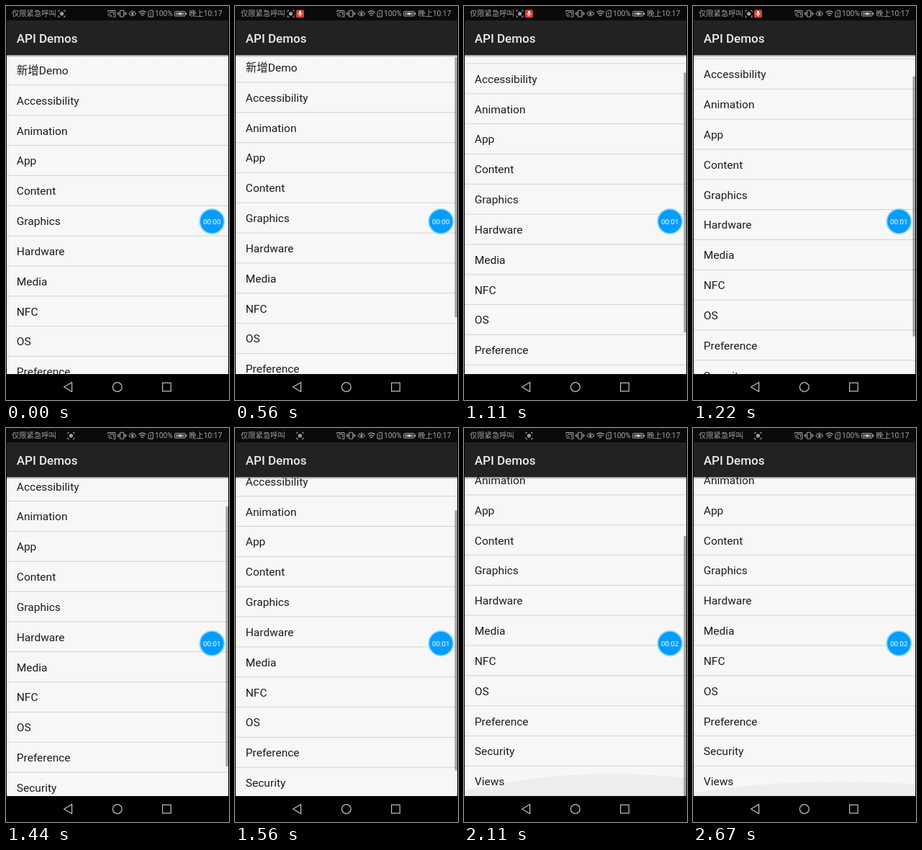
Recreate the animation shown at these times as an HTML page. Size 310 by 547 pixels, loop 3000 ms.

```html
<!DOCTYPE html>
<html lang="zh-CN">
<head>
<meta charset="utf-8">
<title>API Demos</title>
<style>
html, body { margin: 0; width: 100%; height: 100%; overflow: hidden; background: #000; }
svg { display: block; width: 310px; height: 547px; }
text { font-family: Roboto, "Noto Sans CJK SC", "Noto Sans CJK", sans-serif; }
#list text { font-size: 15.5px; fill: #1c1c1c; }
.status text { font-size: 10.3px; fill: #a3a3a3; }
.line { fill: none; stroke: #a8a8a8; }
</style>
</head>
<body>
<svg viewBox="0 0 310 547">
  <defs>
    <clipPath id="view"><rect x="1" y="68" width="308" height="443"/></clipPath>
    <linearGradient id="shade" x2="0" y2="1">
      <stop offset="0" stop-color="#000" stop-opacity=".45"/>
      <stop offset="1" stop-color="#000" stop-opacity="0"/>
    </linearGradient>
  </defs>
  <rect width="310" height="547"/>

  <g clip-path="url(#view)">
    <rect x="1" y="68" width="308" height="443" fill="#f7f7f7"/>
    <g id="list"></g>
    <path id="glow" fill="#000" fill-opacity=".04"/>
    <rect id="thumb" x="305.4" width="3.6" fill="#000"/>
  </g>

  <rect x="1" width="308" height="20" fill="#0a0a0a"/>
  <rect x="1" y="20" width="308" height="48" fill="#222"/>
  <rect x="1" y="68" width="308" height="3" fill="url(#shade)"/>
  <text x="14.8" y="51.2" font-size="17" font-weight="500" fill="#eee">API Demos</text>

  <g class="status">
    <text x="8" y="14.3">仅限紧急呼叫</text>
    <text x="207" y="14.3">100%</text>
    <text x="254.2" y="14.3">晚上10:17</text>
    <g id="focus">
      <circle r="2.7" fill="#999"/>
      <path class="line" stroke="#888" d="M-4.5-2.5v-2h2M2.5-4.5h2v2M4.5 2.5v2h-2M-2.5 4.5h-2v-2"/>
    </g>
    <g id="mic">
      <rect x="85" y="5.2" width="11" height="11" rx="2" fill="#d5402f"/>
      <rect x="89.2" y="6.8" width="2.6" height="4.6" rx="1.3" fill="#fff"/>
      <path d="M87.8 10a2.7 2.7 0 0 0 5.4 0M90.5 12.7v1.7" fill="none" stroke="#fff" stroke-width=".9"/>
    </g>
    <g class="line">
      <path d="M141.7 8.5v-2h10.2v8.6h-3.4M141.7 10.2a5 5 0 0 1 5 5M141.7 12.4a2.8 2.8 0 0 1 2.8 2.8M144 8.7h5.7v4.2"/>
      <path d="M158.6 6.2h5v8.8h-5zM156.8 7.8v5.6M165.4 7.8v5.6M155.2 9v3M167 9v3"/>
      <path d="M170.6 10.8q5.2-5.6 10.4 0q-5.2 5.6-10.4 0zM172 7.2l1 1.2M175.8 5.6v1.6M179.6 7.2l-1 1.2"/>
      <path d="M184.6 9q5-4.2 10 0M186.4 11.2q3.2-2.6 6.4 0M188 13.2q1.6-1.2 3.2 0" stroke-width="1.2"/>
      <path d="M198 8.4l2.2-2.2h4.2v8.8h-6.4zM201.2 8.6v3M201.2 12.4v1.2"/>
      <rect x="234.6" y="7.4" width="14.6" height="6.6" rx="1"/>
    </g>
    <circle cx="175.8" cy="10.8" r="1.6" fill="#a8a8a8"/>
    <rect x="236" y="8.8" width="11.8" height="3.8" fill="#777"/>
    <rect x="249.6" y="9.2" width="1.6" height="3" fill="#a8a8a8"/>
    <path d="M239 11l4-2.2-.6 1.6h3l-4 2.4.6-1.8z" fill="#fff"/>
  </g>

  <circle cx="286.3" cy="299" r="18" fill="#8fdcf8"/>
  <circle cx="286.3" cy="299" r="16.2" fill="#069cfd"/>
  <text id="clock" x="286.3" y="302.6" font-size="9.8" fill="#fff" text-anchor="middle"></text>

  <g fill="none" stroke="#c4c4c4" stroke-width="1.2">
    <path d="M91.6 522.4v13.2L80.6 529z" stroke-linejoin="round"/>
    <circle cx="154.8" cy="529" r="6.4"/>
    <rect x="217.6" y="523.2" width="11.6" height="11.6"/>
  </g>
</svg>
<script>
const $ = id => document.getElementById(id);
const LOOP = 3000, FPS = 9;
const TOP = 68, BOTTOM = 511, VIEW = BOTTOM - TOP, ROW = 41.83;
const items = ["新增Demo", "Accessibility", "Animation", "App", "Content", "Graphics", "Hardware",
  "Media", "NFC", "OS", "Preference", "Security", "Views"];
const total = items.length * ROW, maxScroll = total - VIEW;

// Keys are [step, value] pairs, joined by straight lines.
const scrollKeys = [[4, 0], [5, 4], [8, 17], [11, 36.5], [14, 57], [18, maxScroll]];
const glowKeys = [[17, 0], [19, 31], [21, 31], [24, 20]];
const fadeKeys = [[21, 1], [24, 0]];

function along(keys, s) {
  if (s <= keys[0][0]) return keys[0][1];
  for (let i = 1; i < keys.length; i++) {
    const [a, u] = keys[i - 1], [b, v] = keys[i];
    if (s <= b) return u + (v - u) * (s - a) / (b - a);
  }
  return keys[keys.length - 1][1];
}

$("list").innerHTML = items.map((name, i) => {
  const y = TOP + i * ROW;
  return `<text x="14.8" y="${y + 27}">${name}</text>` +
    `<rect x="1" y="${y + ROW - 0.4}" width="308" height="1" fill="#d2d2d2"/>`;
}).join("");

// Flattened arc of a wide circle rising from the bottom edge.
function glowPath(h) {
  if (!h) return "";
  const rx = 462, ry = rx * h / 62, cx = 205, half = rx / 2;
  return `M${cx - half} ${BOTTOM}A${rx} ${ry} 0 0 1 ${cx + half} ${BOTTOM}Z`;
}

function draw(t) {
  const step = Math.floor((t % LOOP + 5) * FPS / 1000);
  const y = along(scrollKeys, step);
  $("list").setAttribute("transform", `translate(0 ${-y})`);
  $("glow").setAttribute("d", glowPath(along(glowKeys, step)));

  const thumb = $("thumb");
  thumb.setAttribute("y", TOP + y * VIEW / total);
  thumb.setAttribute("height", VIEW * VIEW / total);
  thumb.setAttribute("fill-opacity", step < 5 ? 0 : 0.33 * along(fadeKeys, step));

  $("mic").setAttribute("visibility", step >= 1 && step < 12 ? "visible" : "hidden");
  $("focus").setAttribute("transform", `translate(${step < 12 ? 77.6 : 90.4} 10.7)`);
  $("clock").textContent = "00:0" + (step < 10 ? 0 : step < 19 ? 1 : 2);
}

const start = performance.now();
function tick() {
  draw(performance.now() - start);
  requestAnimationFrame(tick);
}
tick();
</script>
</body>
</html>
```
